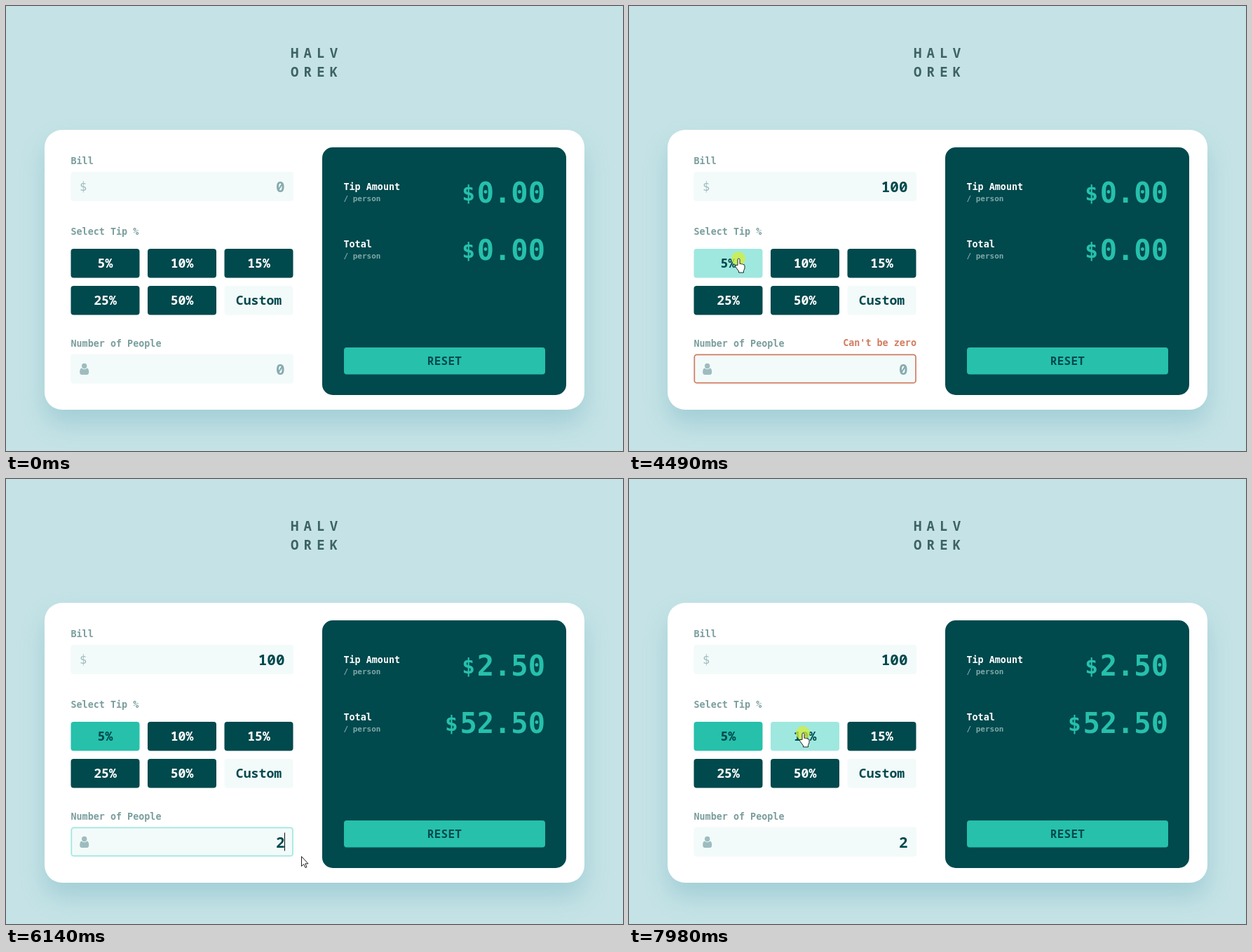
Write an HTML page that moves like this. It is 880 by 636 pixels and loops after 8 s.

```html
<!DOCTYPE html>
<html lang="en">
<head>
<meta charset="utf-8">
<title>Tip calculator</title>
<style>
  html, body { margin: 0; width: 100%; height: 100%; overflow: hidden; background: #c5e3e6; }
  #card { position: absolute; left: 55px; top: 177px; width: 770px; height: 400px;
    border-radius: 25px; background: #fff; box-shadow: 0 20px 34px rgba(82, 160, 180, .3); }
  svg { position: absolute; left: 0; top: 0; }
  text { font: bold 13.4px "DejaVu Sans Mono", monospace; white-space: pre; }
  .end { text-anchor: end; }
  .mid { text-anchor: middle; }
  .logo { font: 600 19px "Noto Sans Mono", monospace; letter-spacing: 7.2px; fill: #3d6266; }
  .label { fill: #7a9d9d; }
  .error { fill: #d17c5f; }
  .white { fill: #fff; }
  .small { font-size: 11px; fill: #7fa9a9; }
  .amount { font-size: 40.4px; fill: #26c0ab; }
  .unit { font-size: 31px; fill: #26c0ab; }
  .value { font: bold 21px "Noto Sans Mono", monospace; fill: #00494d; }
  .button { font: bold 18.2px "Noto Sans Mono", monospace; }
  .reset { font: bold 16px "Noto Sans Mono", monospace; letter-spacing: .3px; fill: #00494d; }
  .icon { font: 17px "DejaVu Sans Mono", monospace; fill: #9ebcbf; }
  .cursor { fill: #fff; stroke: #222; stroke-width: 1; stroke-linejoin: round; }
</style>
</head>
<body>
<div id="card"></div>
<svg id="stage" width="880" height="636" viewBox="0 0 880 636"></svg>
<script>
const DURATION = 8000;
const DARK = '#00494d', TEAL = '#26c0ab', MINT = '#9fe8df', PALE = '#f3fafa', ERROR = '#d17c5f';
const stage = document.getElementById('stage');

function add(tag, attributes, content = '') {
  const node = document.createElementNS('http://www.w3.org/2000/svg', tag);
  for (const name in attributes) node.setAttribute(name, attributes[name]);
  node.textContent = content;
  return stage.appendChild(node);
}
const text = (content, x, y, style) => add('text', { x, y, class: style }, content);
const rect = (x, y, width, height, rx, fill) => add('rect', { x, y, width, height, rx, fill });
const show = (node, visible) => { node.style.display = visible ? '' : 'none'; };

text('HALV', 406, 74, 'logo');
text('OREK', 406, 101, 'logo');

function makeField(label, y) {
  text(label, 92.5, y - 11, 'label');
  rect(92.5, y, 317.5, 42, 4, PALE);
  const border = rect(93.3, y + .8, 315.7, 40.4, 3.5, 'none');
  border.setAttribute('stroke-width', 1.7);
  return {
    y, border,
    value: text('0', 397.5, y + 29, 'value end'),
    caret: rect(397, y + 8, 1, 26, 0, '#111')
  };
}
const bill = makeField('Bill', 237);
text('$', 105, 264, 'icon');
text('Select Tip %', 92.5, 327, 'label');
const people = makeField('Number of People', 497.5);
add('path', {
  fill: '#9ebcbf',
  d: 'M108 514.5a3.7 3.7 0 1 1 7.4 0a3.7 3.7 0 1 1-7.4 0z' +
     'M107.5 517.5q4.200 3.500 8.400 0q2.300 1.200 2.300 5.500q0 4-3 4h-7q-3 0-3-4q0-4.300 2.300-5.500z'
});
const error = text("Can't be zero", 410, 486, 'error end');

const buttons = ['5%', '10%', '15%', '25%', '50%', 'Custom'].map((label, i) => {
  const x = 92.5 + i % 3 * 109.5, y = 347 + Math.floor(i / 3) * 53;
  return {
    x, y, custom: i === 5,
    box: rect(x, y, 98, 41.500, 4, DARK),
    label: text(label, x + 49, y + 27.3, 'button mid')
  };
});

rect(451, 202, 348, 354, 15, DARK);
function makeResult(label, y) {
  text(label, 481.5, y, 'white');
  text('/ person', 481.5, y + 16, 'small');
  return { digits: text('', 769, y + 18.500, 'amount end'), unit: text('$', 0, y + 15, 'unit mid') };
}
const tip = makeResult('Tip Amount', 262.5);
const total = makeResult('Total', 344.5);
rect(482, 488, 287, 38.5, 4, TEAL);
text('RESET', 625.5, 513, 'reset mid');

const clickSpot = add('circle', { r: 10, fill: '#d2ee3e', opacity: .78 });
const cursors = {
  arrow: add('path', { class: 'cursor', d: 'M.5 .5V14.500l3.200-3 2.300 5 2-.9-2.200-4.800H10z' }),
  hand: add('path', {
    class: 'cursor',
    d: 'M-1 9.500V1.500a1.500 1.500 0 0 1 3 0V7.500q1.200-1 2.400.4q1.200-.8 2.300.6q2.300-.4 2.300 2v3.500' +
       'l-1.500 3.500v2.500H.5v-2L-4.300 11.500q-.6-2 1.300-2.200z'
  }),
  beam: add('path', { fill: 'none', stroke: '#333', d: 'M-3.500-6.500H-1L0-6L1-6.500H3.500M0-6V6M-3.500 6.500H-1L0 6L1 6.500H3.500' })
};

// Pointer legs: start time, end time, start point, end point.
const legs = [
  [500, 920, 679, 393, 338, 265],
  [1460, 1670, 338, 265, 357, 288],
  [3870, 4440, 357, 288, 156, 361],
  [4690, 5460, 156, 361, 310, 514],
  [5730, 6270, 310, 514, 440, 543],
  [7130, 7880, 440, 543, 248, 363]
];
const clicks = [[1180, 1250], [4490, 4560], [5590, 5660], [7910, DURATION]];
const during = (t, spans) => spans.some(([from, to]) => t >= from && t < to);

function pointerAt(t) {
  const [from, to, x0, y0, x1, y1] = legs.filter(leg => leg[0] <= t).pop() || legs[0];
  const p = Math.max(0, Math.min(1, (t - from) / (to - from)));
  const eased = p * p * (3 - 2 * p);
  return [x0 + (x1 - x0) * eased, y0 + (y1 - y0) * eased];
}

function updateField(field, value, focused, invalid, hovered, caretOn) {
  field.value.textContent = value || '0';
  field.value.style.fill = value ? DARK : '#87abae';
  field.border.setAttribute('stroke', invalid ? ERROR : focused || hovered ? MINT : 'none');
  show(field.caret, caretOn);
}

function updateResult(result, amount) {
  const digits = amount.toFixed(2);
  result.digits.textContent = digits;
  result.unit.setAttribute('x', 769 - 24.3 * (digits.length + .5));
}

function render(t) {
  const [x, y] = pointerAt(t);
  const visible = t >= 500;
  const inside = (left, top, width, height) =>
    visible && x >= left && x < left + width && y >= top && y < top + height;
  const overField = field => inside(92.5, field.y, 317.5, 42);

  const billValue = t < 2390 ? '' : t < 2720 ? '1' : t < 2810 ? '10' : '100';
  const peopleValue = t < 6140 ? '' : '2';
  const invalid = billValue !== '' && peopleValue === '';
  updateField(bill, billValue, t >= 1180 && t < 4490, false, overField(bill),
    during(t, [[1180, 1730], [2260, 3340], [3870, 4490]]));
  updateField(people, peopleValue, t >= 5590 && t < 7910, invalid, overField(people),
    during(t, [[5590, 6670], [7200, 7910]]));
  show(error, invalid);

  let shape = overField(bill) || overField(people) || inside(340, 279, 30, 13) ? 'beam' : 'arrow';
  buttons.forEach((button, i) => {
    const hovered = inside(button.x, button.y, 98, 41.500);
    const selected = i === 0 && t >= 4560;
    if (hovered) shape = button.custom ? 'beam' : 'hand';
    const fill = button.custom ? PALE : hovered ? MINT : selected ? TEAL : DARK;
    button.box.setAttribute('fill', fill);
    button.label.style.fill = fill === DARK ? '#fff' : DARK;
  });

  const count = Number(peopleValue);
  updateResult(tip, count ? billValue * .05 / count : 0);
  updateResult(total, count ? billValue * 1.05 / count : 0);

  const place = `translate(${Math.round(x)} ${Math.round(y)})`;
  for (const name in cursors) {
    cursors[name].setAttribute('transform', place);
    show(cursors[name], visible && name === shape);
  }
  clickSpot.setAttribute('transform', place);
  show(clickSpot, during(t, clicks));
}

function tick() {
  render(performance.now() % DURATION);
  requestAnimationFrame(tick);
}
tick();
</script>
</body>
</html>
```
